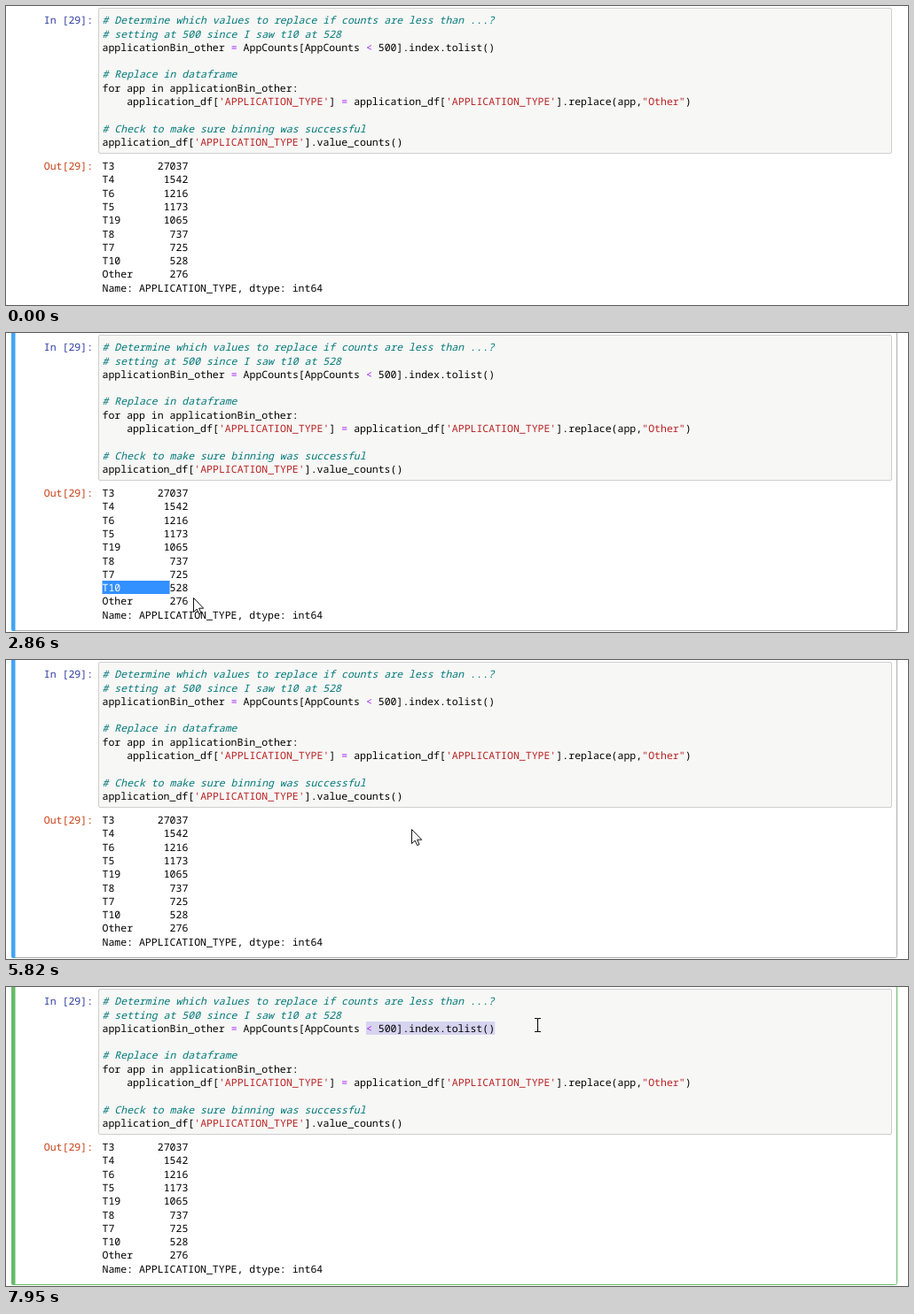
An HTML page that plays this animation: 1017x338 px, repeating every 8 s.

```html
<!DOCTYPE html>
<html lang="en">
<head>
<meta charset="utf-8">
<title>Notebook cell</title>
<style>
  html, body { margin: 0; width: 100%; height: 100%; overflow: hidden; background: #fff; }
  svg { display: block; width: 100%; height: 100%; }
  text {
    font: 500 11.53px "Noto Sans Mono", "DejaVu Sans Mono", monospace;
    white-space: pre;
    text-rendering: geometricPrecision;
  }
  .comment { fill: #007979; font-style: italic; }
  .string { fill: #ba2121; }
  .operator { fill: #a2f; }
</style>
</head>
<body>
<svg id="stage" viewBox="0 0 1017 338">
  <rect width="1017" height="338" fill="#fff"/>
  <g id="frame">
    <path id="edge" d="M8 336.5H1002.5Q1004.5 336.5 1004.5 334.5V0" fill="none"/>
    <path id="bar" d="M6 0H10.5V337H8Q6 337 6 335Z"/>
  </g>
  <rect x="104.5" y="2.5" width="894" height="164" rx="1.5" fill="#f7f7f6" stroke="#cfcfcf"/>
  <rect id="codeSel" y="39" height="15" fill="#d7d4f0"/>
  <g id="boxes" fill="#3390ff"></g>
  <g id="texts"></g>
  <path id="arrow" d="M.5.5V16.6L4.2 13.1 6.7 18.6 9 17.6 6.6 12.2H11.7Z" fill="#fff" stroke="#111"/>
  <path id="beam" d="M-3.5-7.5H-1Q0-7.5 0-6.5V6.5Q0 7.5-1 7.5H-3.5M3.5-7.5H1Q0-7.5 0-6.5M3.5 7.5H1Q0 7.5 0 6.5"
        fill="none" stroke="#111" stroke-width="1.2"/>
</svg>
<script>
const LOOP = 8000, STEP = 70;
const LEFT = 108.5, CHAR = 6.918, LINE = 15.3;
const SELECT_CELL = 2050, EDIT_CELL = 7180, SEL_START = 43, SEL_END = 64;

const $ = id => document.getElementById(id);
const colX = col => LEFT + col * CHAR;
const codeY = row => 20.2 + row * LINE;
const outY = row => 185 + row * LINE;

function add(parent, tag, attrs, content = '') {
  const el = document.createElementNS('http://www.w3.org/2000/svg', tag);
  for (const key in attrs) el.setAttribute(key, attrs[key]);
  el.textContent = content;
  return parent.appendChild(el);
}
const write = (col, y, content, attrs) =>
  add($('texts'), 'text', { x: colX(col), y: Math.round(y), ...attrs }, content);

const code = `# Determine which values to replace if counts are less than ...?
# setting at 500 since I saw t10 at 528
applicationBin_other = AppCounts[AppCounts < 500].index.tolist()

# Replace in dataframe
for app in applicationBin_other:
    application_df['APPLICATION_TYPE'] = application_df['APPLICATION_TYPE'].replace(app,"Other")

# Check to make sure binning was successful
application_df['APPLICATION_TYPE'].value_counts()`;

function tokenClass(token) {
  if (token[0] === '#') return 'comment';
  if (/^['"]/.test(token)) return 'string';
  return /^[=<]$/.test(token) ? 'operator' : 'plain';
}

code.split('\n').forEach((line, row) => {
  let col = 0;
  for (const token of line.split(/(#.*|'[^']*'|"[^"]*"|[=<])/)) {
    const word = token.trim();
    if (word) write(col + token.indexOf(word), codeY(row), word, { class: tokenClass(token) });
    col += token.length;
  }
});

write(-9.5, codeY(0), 'In [29]:', { fill: '#303f9f' });
write(-9.5, outY(0), 'Out[29]:', { fill: '#c93f15' });

const output = `T3       27037
T4        1542
T6        1216
T5        1173
T19       1065
T8         737
T7         725
T10        528
Other      276`;

// Every output word, with its place, so that it can be selected later
const words = output.split('\n').flatMap((line, row) =>
  [...line.matchAll(/\S+/g)].map(({ 0: word, index: col }) =>
    ({ word, row, col, el: write(col, outY(row), word) })));
write(0, outY(9), 'Name: APPLICATION_TYPE, dtype: int64');

// A double click takes the word and the blanks behind it
function select(name, from, to) {
  const { row, col, el } = words.find(w => w.word === name);
  const box = add($('boxes'), 'rect', {
    x: colX(col), y: Math.round(outY(row) - 12.2),
    width: CHAR * (col ? name.length : 11), height: 15
  });
  return { el, box, from, to };
}
const selections = [
  select('T10', 2120, 3590),
  select('276', 3740, 5010),
  select('Other', 5140, 5820)
];

// Pointer key points: leave at, arrive at, x, y
const entry = [848, 330];
const stops = [
  [460, 1220, 162, 282],
  [1290, 1430, 137, 282],
  [1500, 2050, 110, 283],
  [2120, 2250, 121, 288],
  [2510, 2860, 211, 299],
  [2930, 2930, 213, 305],
  [3130, 3740, 199, 301],
  [3940, 4070, 287, 299],
  [4270, 4610, 131, 307],
  [4680, 5010, 127, 302],
  [5410, 5820, 457, 191],
  [6150, 6910, 406, 46],
  [7180, 7600, 594, 42],
  [7950, 7950, 599, 43]
];

const smooth = p => p * p * (3 - 2 * p);

function pointer(t) {
  const i = stops.findLastIndex(([leave]) => t >= leave);
  if (i < 0) return null;
  const [leave, arrive, ...goal] = stops[i];
  const home = i ? stops[i - 1].slice(2) : entry;
  const steps = Math.round((arrive - leave) / STEP) + 1;
  const done = t >= arrive ? 1 : Math.min(1, (Math.floor((t - leave) / STEP) + 1) / steps);
  return goal.map((g, k) => Math.round(home[k] + (g - home[k]) * smooth(done)));
}

function overText([x, y]) {
  if (y < 167) return x > 104 && x < 999;
  const cols = y < 311 ? 14 : 36;
  return x > 105 && x < colX(cols) && y > 172 && y < 327;
}

const show = (el, on) => el.setAttribute('visibility', on ? 'visible' : 'hidden');

function draw(t) {
  const at = pointer(t), editing = t >= EDIT_CELL;
  const beam = at && overText(at);
  show($('arrow'), at && !beam);
  show($('beam'), beam);
  if (at) {
    $('arrow').setAttribute('transform', `translate(${at})`);
    $('beam').setAttribute('transform', `translate(${at[0] + 0.5} ${at[1]})`);
  }

  show($('frame'), t >= SELECT_CELL);
  $('bar').setAttribute('fill', editing ? '#66bb6a' : '#42a5f5');
  $('edge').setAttribute('stroke', editing ? '#66bb6a' : '#ababab');

  for (const { el, box, from, to } of selections) {
    const on = t >= from && t < to;
    show(box, on);
    el.setAttribute('fill', on ? '#fff' : '#000');
  }

  const end = editing ? Math.min(SEL_END, Math.round((at[0] - LEFT) / CHAR)) : SEL_START;
  $('codeSel').setAttribute('x', colX(SEL_START));
  $('codeSel').setAttribute('width', Math.max(0, end - SEL_START) * CHAR);
}

function tick() {
  draw(performance.now() % LOOP);
  requestAnimationFrame(tick);
}
tick();
</script>
</body>
</html>
```
